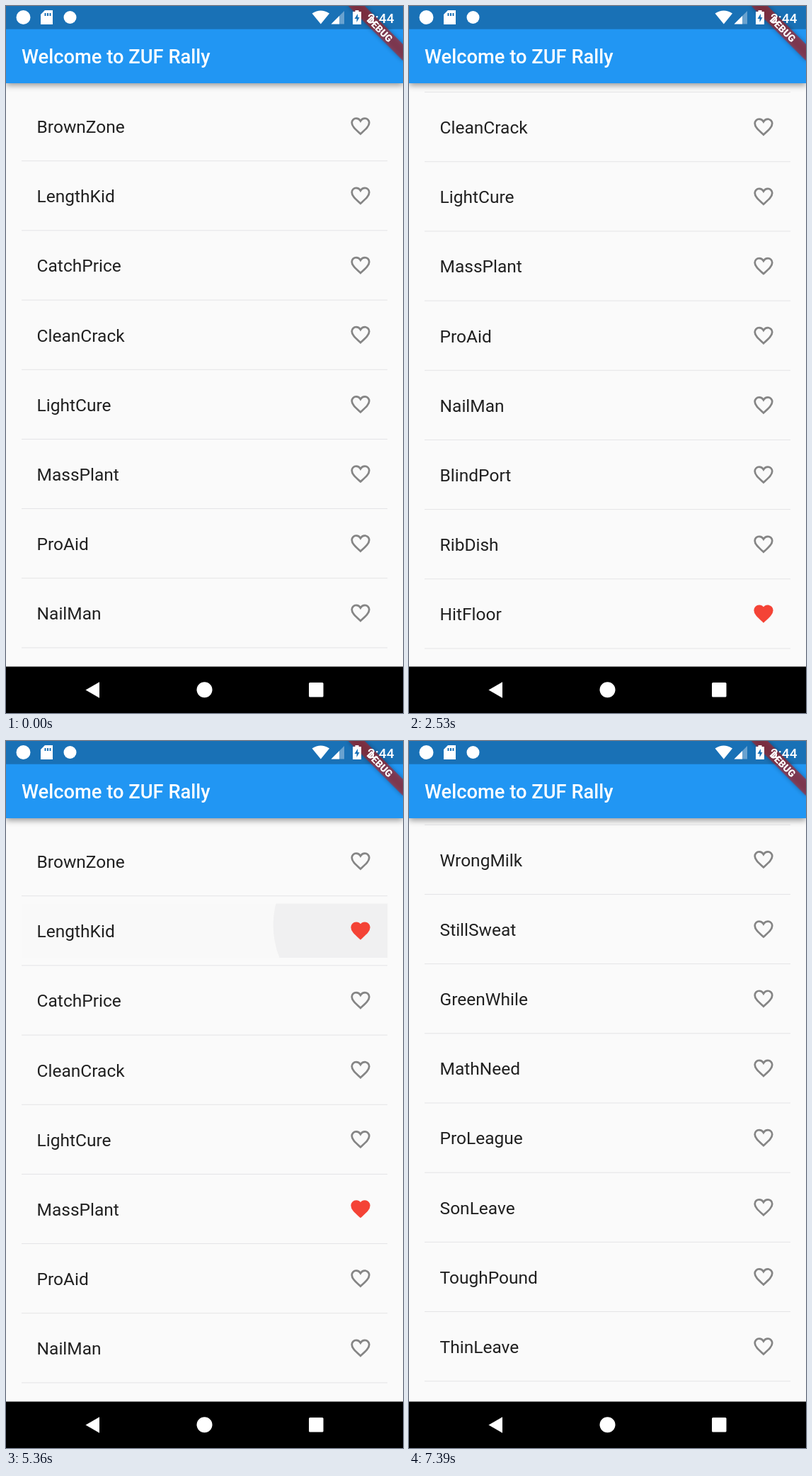
Write an HTML page that moves like this. It is 561x998 px and loops after 7800 ms.

```html
<!DOCTYPE html>
<html lang="en">
<head>
<meta charset="utf-8">
<title>Event list</title>
<style>
  html, body { margin: 0; width: 100%; height: 100%; overflow: hidden; background: #fafafa; }
  svg { display: block; }
  text { font-family: Roboto, "Noto Sans", sans-serif; }
  .name { font-size: 24.5px; fill: #202020; }
  .title { font-size: 27.3px; font-weight: 500; fill: #fff; }
  .clock { font-size: 19px; font-weight: 500; }
  .debug { font-size: 13.9px; font-weight: 900; fill: #fff; text-anchor: middle; }
  .heart { fill: none; stroke: #858585; stroke-width: 2; }
  .heart.on { fill: #f44336; stroke: #f44336; }
  .bar { filter: drop-shadow(0 3px 4px rgba(0, 0, 0, .4)); }
  .banner { filter: drop-shadow(0 0 3px rgba(0, 0, 0, .5)); }
</style>
</head>
<body>
<svg width="561" height="998" viewBox="0 0 561 998">
  <g id="list">
    <svg id="ink" x="21.8" width="517.4" height="76.4">
      <rect id="shade" width="100%" height="100%" fill="#bcbcbc"/>
      <circle id="splash" cy="30.5" fill="#c0c0c6"/>
    </svg>
  </g>
  <g transform="translate(280.5 109)">
    <circle id="glow" cy="-164" r="420.75" fill="#2196f3"/>
  </g>

  <rect class="bar" y="-10" width="561" height="119" fill="#2196f3"/>
  <text class="title" x="22" y="81">Welcome to ZUF Rally</text>
  <rect width="561" height="32.7" opacity=".25"/>

  <g transform="translate(561) rotate(45)">
    <rect class="banner" x="-54.5" y="38.2" width="109" height="16.4" fill="#b71c1c" fill-opacity=".63"/>
    <text class="debug" y="51.3">DEBUG</text>
  </g>

  <!-- status icons lie above the app -->
  <g fill="#fff">
    <circle cx="24.5" cy="16" r="10"/>
    <path d="M55 6H66V26H49V12Z"/>
    <path d="M55.5 10V14M59 10V14M62.5 10V14" stroke="#1971b6" stroke-width="2"/>
    <circle cx="90.5" cy="16" r="9"/>
    <path d="M444.8 25.5 432.5 10.5Q444.8 2.5 457 10.5Z"/>
    <path d="M478 7V25.5H459.5Z" opacity=".35"/>
    <path d="M471 14V25.5H459.5Z"/>
    <path d="M493.5 6H498.5V8H502V26H490V8H493.5Z"/>
    <path d="M497 11 492.5 18H495.5V23L499.5 16H497Z" fill="#1971b6"/>
    <text class="clock" x="511" y="23.5">2:44</text>
  </g>

  <rect y="932.5" width="561" height="66"/>
  <g fill="#fff">
    <path d="M112.5 965.5 132 954.3V976.7Z"/>
    <circle cx="280.5" cy="965.2" r="11"/>
    <rect x="428" y="955" width="20.5" height="20.5" rx="1.5"/>
  </g>
</svg>

<script>
const LOOP = 7800, PITCH = 98.18, TOP = 131.4;
const HEART = "M12 20.1C6.3 14.9 3 12 3 8.5 3 6 5 4 7.5 4 9.3 4 11 5 12 6.7 13 5 14.7 4 16.5 4 19 4 21 6 21 8.5 21 12 17.7 14.9 12 20.1Z";
const names = `BrownZone LengthKid CatchPrice CleanCrack LightCure MassPlant ProAid NailMan
  BlindPort RibDish HitFloor DoorWeed BlackBridge DumbDrink MudBone GuiltSack TruthDust TermOdds
  SoftLamp NightRow DeepChair FlatHorn CoolBench RoundTale GrainStep LateBowl
  ClassDisc DrySide NeedBean ProAct DumbFat PoolSir BoldNews WrongMilk StillSweat GreenWhile
  MathNeed ProLeague SonLeave ToughPound ThinLeave PlainStew WarmCord`.split(/\s+/);
const liked = ["HitFloor", "DoorWeed", "BlackBridge", "DumbDrink"];

// each fling: start, end, resting place
const flings = [
  [20, 790, 1100], [900, 1200, 0], [2000, 2530, 293.5], [2840, 2910, 302],
  [4210, 4420, 0], [5780, 6600, 2576], [6620, 6730, 2600], [7070, 7390, 3242.2]
];
const presses = [
  { at: 1990, row: 5, x: 289, tap: false },
  { at: 3520, row: 5, x: 479, tap: true },
  { at: 5230, row: 1, x: 479, tap: true }
];

const $ = id => document.getElementById(id);
const clamp = v => Math.min(1, Math.max(0, v));
const easeOut = u => 1 - (1 - clamp(u)) ** 1.375;
const set = (el, attrs) => Object.entries(attrs).forEach(([k, v]) => el.setAttribute(k, v));

$("list").insertAdjacentHTML("beforeend", names.map((name, i) => `
  <g transform="translate(0 ${TOP + i * PITCH})">
    <text class="name" x="43.6" y="47.6">${name}</text>
    <path class="heart" transform="translate(484.6 21.8) scale(1.3636)" d="${HEART}"/>
    <path d="M22 87.3H539" stroke="#e4e4e6"/>
  </g>`).join(""));
const hearts = document.querySelectorAll(".heart");

const scrollAt = t => flings.reduce((pos, [start, end, to]) =>
  pos + (to - pos) * easeOut((t - start) / (end - start)), 0);

// a fling that hits the top edge makes it glow
function glowAt(t) {
  const hit = flings.find(([, end, to]) => to === 0 && t > end && t < end + 530);
  if (!hit) return 0;
  const age = t - hit[1];
  return age < 70 ? age / 70 : ((530 - age) / 460) ** 2;
}

function drawInk(t) {
  const press = presses.find(({ at }) => t >= at && t < at + 220);
  $("ink").style.display = press ? "" : "none";
  if (!press) return;
  const u = (t - press.at) / 220, reach = press.tap ? 200 : 30;
  set($("ink"), { y: TOP + press.row * PITCH });
  set($("shade"), { opacity: .06 * (1 - u) });
  set($("splash"), { cx: press.x, r: 5 + reach * u, opacity: .4 * (1 - u) });
}

function draw() {
  const t = Math.floor(performance.now() % LOOP / 10) * 10, glow = glowAt(t);
  set($("list"), { transform: `translate(0 ${-scrollAt(t)})` });
  set($("glow"), { transform: `scale(1 ${.233 * glow})`, opacity: .32 * Math.sqrt(glow) });
  drawInk(t);
  hearts.forEach((heart, i) => heart.classList.toggle("on",
    liked.includes(names[i]) || presses.some(p => p.tap && p.row === i && t > p.at)));
  requestAnimationFrame(draw);
}
draw();
</script>
</body>
</html>
```
